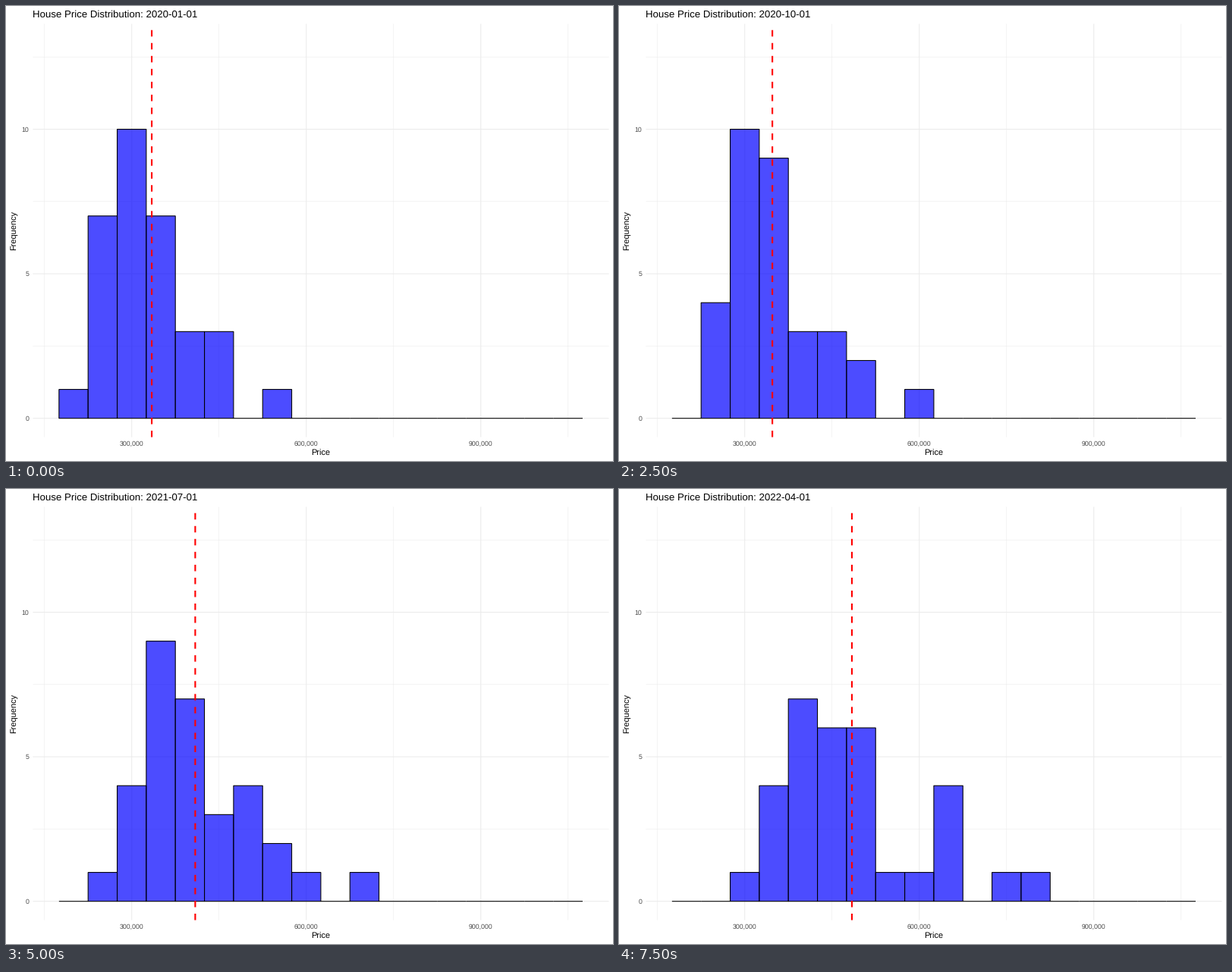
Animation of 800x600 px, one loop 8000 ms. Source, as a matplotlib script:

```python
import numpy as np
import matplotlib.pyplot as plt
from matplotlib.animation import FuncAnimation
from matplotlib.patches import Rectangle

plt.rcParams.update({"font.family": "Liberation Sans", "text.hinting": "none"})

DPI = 100
PX = 72 / DPI  # points per pixel
LEFT, RIGHT, TOP, BOTTOM = 35.4, 794.5, 23.6, 568.5
FRAMES, STEP = 16, 500
N_BINS, BIN_START, BIN_WIDTH = 18, 175, 50  # thousands
MONTHS_PER_FRAME = 16 / 9

# (first frame, first non-empty bin, counts from that bin on)
HISTOGRAMS = [
    (0, 0, [1, 7, 10, 7, 3, 3, 0, 1]),
    (1, 0, [1, 7, 10, 6, 4, 2, 1, 0, 1]),
    (5, 1, [4, 10, 9, 3, 3, 2, 0, 1]),
    (6, 1, [3, 10, 8, 5, 3, 2, 0, 1]),
    (7, 1, [2, 10, 7, 6, 4, 2, 0, 0, 1]),
    (8, 1, [1, 9, 7, 7, 3, 3, 1, 0, 1]),
    (9, 1, [1, 7, 8, 7, 2, 4, 2, 0, 0, 1]),
    (10, 1, [1, 4, 9, 7, 3, 4, 2, 1, 0, 1]),
    (11, 1, [1, 4, 8, 7, 4, 3, 3, 1, 0, 1]),
    (12, 1, [1, 4, 7, 7, 5, 2, 3, 1, 1, 1]),
    (13, 1, [1, 2, 7, 7, 5, 3, 3, 1, 1, 2]),
    (14, 2, [1, 6, 7, 6, 5, 1, 1, 3, 1, 1]),
    (15, 2, [1, 4, 7, 6, 6, 1, 1, 4, 0, 1, 1]),
]

# mean price in thousands, by months since January 2020
MEAN_MONTHS = [0, 2, 5, 7, 9, 12, 16, 21, 27]
MEAN_PRICES = [334.4, 338.4, 339.1, 341.6, 347.5, 366.3, 397.9, 426.0, 484.2]


def x_px(price):
    return 165.7 + (price - 300) * 0.7668


def y_px(count):
    return 543.7 - count * 38.12


fig = plt.figure(figsize=(8, 6), dpi=DPI, facecolor="white")
ax = fig.add_axes([0, 0, 1, 1])
ax.set(xlim=(0, 800), ylim=(600, 0))
ax.axis("off")


def line(xs, ys, color, width, **kw):
    return ax.plot(xs, ys, color=color, lw=width * PX, snap=False,
                   solid_capstyle="butt", dash_capstyle="butt", **kw)[0]


def label(x, y, text, size, color="black", ha="center", **kw):
    return ax.text(x, y, text, fontsize=size * PX, color=color, ha=ha,
                   va="baseline", **kw)


def grid(prices, counts, width):
    for c in counts:
        line([LEFT, RIGHT], [y_px(c)] * 2, "#ebebeb", width, zorder=1)
    for p in prices:
        line([x_px(p)] * 2, [TOP, BOTTOM], "#ebebeb", width, zorder=1)


grid((150, 450, 750, 1050), (2.5, 7.5, 12.5), 0.53)
grid((300, 600, 900), (0, 5, 10), 1.07)

for p in (300, 600, 900):
    label(x_px(p), 580, f"{p},000", 8.8, "#4d4d4d")
for c in (0, 5, 10):
    label(30.5, y_px(c) + 3.3, str(c), 8.8, "#4d4d4d", "right")
label((LEFT + RIGHT) / 2, 593, "Price", 11)
label(13, (TOP + BOTTOM) / 2, "Frequency", 11, rotation=90,
      rotation_mode="anchor")
title = label(LEFT, 15, "", 13.2, ha="left")

bars = []
for i in range(N_BINS):
    bar = Rectangle((x_px(BIN_START + i * BIN_WIDTH), y_px(0)),
                    BIN_WIDTH * 0.7668, 0, facecolor=(0, 0, 1, 0.7),
                    edgecolor="black", lw=1.07 * PX, joinstyle="miter",
                    snap=False, zorder=2)
    bars.append(ax.add_patch(bar))

mean_line = line([0, 0], [BOTTOM, TOP], "red", 2.13, zorder=3,
                 linestyle=(0, (4, 4)))


def update(frame):
    month = round(frame * MONTHS_PER_FRAME)
    title.set_text("House Price Distribution: "
                   f"{2020 + month // 12}-{month % 12 + 1:02d}-01")

    _, first, values = [h for h in HISTOGRAMS if h[0] <= frame][-1]
    counts = np.zeros(N_BINS)
    counts[first:first + len(values)] = values
    for bar, count in zip(bars, counts):
        bar.set_height(y_px(count) - y_px(0))

    mean = np.interp(month, MEAN_MONTHS, MEAN_PRICES)
    mean_line.set_xdata([x_px(mean)] * 2)
    return [title, mean_line, *bars]


anim = FuncAnimation(fig, update, frames=FRAMES, interval=STEP,
                     repeat=True, repeat_delay=0, blit=False)
plt.show()
```
